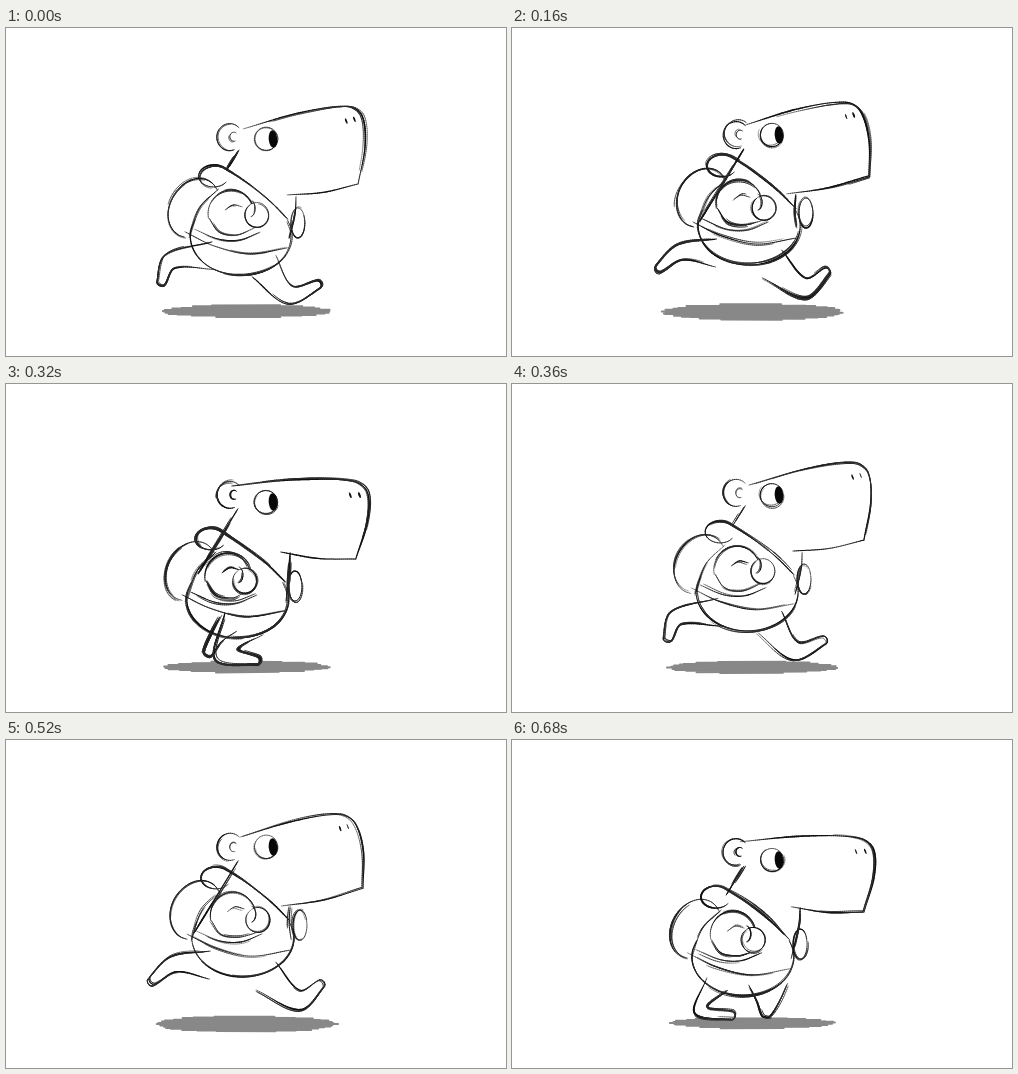
Recreate the animation shown at these times as an HTML page with a canvas. Size 500 by 328 pixels, loop 720 ms.

```html
<!DOCTYPE html>
<html lang="en">
<head>
<meta charset="utf-8">
<title>Running capybara sketch</title>
<style>
html, body { margin: 0; width: 100%; height: 100%; overflow: hidden; background: #fff; }
canvas { display: block; }
</style>
</head>
<body>
<canvas id="stage" width="500" height="328"></canvas>
<script>
const ctx = document.getElementById('stage').getContext('2d');
const LOOP = 720;

// Key positions only; the rest of the figure hangs from them.
// head: brow, snout, chin, jaw. Legs: hip, heel, toe, with a half-width at the hip.
const push = {
  ink: 1, lift: .2, ear: 109, eye: 111, tail: 1, body: [208, 148], hand: [251, 187],
  head: [[237, 101], [354, 78], [352, 156], [281, 167]],
  back: { joints: [[208, 228], [164, 234], [155, 256]], width: 14 },
  front: { joints: [[258, 238], [284, 267], [313, 256]], width: 16 }
};
const glide = {
  ink: 1.2, lift: 1, ear: 107, eye: 107, tail: 4, body: [210, 138], hand: [252, 180],
  head: [[234, 97], [345, 74], [357, 148], [275, 166]],
  back: { joints: [[204, 225], [168, 224], [146, 241]], width: 14 },
  front: { joints: [[260, 236], [294, 260], [316, 243]], width: 17 }
};
const land = {
  ink: 1.35, lift: 0, ear: 122, eye: 128, tail: .9, body: [207, 158], hand: [244, 207],
  head: [[235, 112], [342, 77], [358, 145], [274, 184]],
  back: { joints: [[208, 248], [184, 255], [175, 274]], width: 16 },
  front: { joints: [[268, 252], [263, 271], [297, 276]], width: 17 }
};
const low = {
  ink: 1.25, lift: 0, ear: 111, eye: 118, tail: 3.6, body: [205, 155], hand: [239, 197],
  head: [[226, 102], [361, 99], [350, 175], [275, 168]],
  back: { joints: [[222, 240], [210, 254], [201, 270]], width: 11 },
  front: { joints: [[238, 240], [221, 270], [252, 277]], width: 22 }
};
const air = {
  ink: .95, lift: .7, ear: 109, eye: 109, tail: 1.1, body: [207, 143], hand: [250, 183],
  head: [[241, 97], [353, 73], [353, 152], [283, 166]],
  back: { joints: [[205, 230], [191, 236], [181, 252]], width: 14 },
  front: { joints: [[232, 222], [271, 251], [297, 230]], width: 20 }
};
const squash = {
  ink: 1, lift: 0, ear: 123, eye: 128, tail: 1, body: [210, 160], hand: [244, 206],
  head: [[234, 116], [340, 79], [358, 145], [278, 184]],
  back: { joints: [[213, 252], [204, 260], [196, 269]], width: 7 },
  front: { joints: [[236, 250], [222, 271], [257, 279]], width: 22 }
};
const pass = {
  ink: 1.15, lift: 0, ear: 112, eye: 120, tail: 1.6, body: [204, 157], hand: [241, 200],
  head: [[228, 102], [360, 100], [352, 172], [279, 167]],
  back: { joints: [[205, 244], [189, 270], [221, 275]], width: 12 },
  front: { joints: [[256, 245], [256, 262], [254, 276]], width: 19 }
};

// Start time in ms and the pose held from then on.
const TIMELINE = [
  [0, push], [80, { ...air, back: push.back, front: push.front }], [160, glide], [240, land], [320, low],
  [360, push], [440, air], [520, { ...glide, ink: 1 }], [600, squash], [680, pass]
];

let seed = 1;
function rnd() {
  seed = (seed * 16807) % 2147483647;
  return seed / 2147483647;
}
const vary = a => (rnd() * 2 - 1) * a;

const add = (p, x, y) => [p[0] + x, p[1] + y];
const mix = (a, b, t) => [a[0] + (b[0] - a[0]) * t, a[1] + (b[1] - a[1]) * t];
const dist = (a, b) => Math.hypot(a[0] - b[0], a[1] - b[1]);

// Unit normal to the left of the direction a to b.
function normal(a, b) {
  const d = dist(a, b) || 1;
  return [(b[1] - a[1]) / d, (a[0] - b[0]) / d];
}

// Point along a line, pushed sideways.
function bow(a, b, t, amount) {
  const n = normal(a, b);
  return add(mix(a, b, t), n[0] * amount, n[1] * amount);
}

// Points on a tilted ellipse between two angles in degrees.
function arc([cx, cy], rx, ry, from = -30, to = 340, tilt = 0) {
  const c = Math.cos(tilt), s = Math.sin(tilt);
  return Array.from({ length: 15 }, (_, i) => {
    const a = (from + (to - from) * i / 14) * Math.PI / 180;
    const x = rx * Math.cos(a), y = ry * Math.sin(a);
    return [cx + x * c - y * s, cy + x * s + y * c];
  });
}

// Hermite curve through the points, with tangents scaled to chord length.
function smooth(pts) {
  const slope = pts.map((p, i) => {
    const a = pts[Math.max(0, i - 1)], b = pts[Math.min(pts.length - 1, i + 1)];
    const d = dist(a, p) + dist(p, b) || 1;
    return [(b[0] - a[0]) / d, (b[1] - a[1]) / d];
  });
  const out = [pts[0]];
  for (let i = 0; i < pts.length - 1; i++) {
    const d = dist(pts[i], pts[i + 1]), steps = Math.ceil(d / 2);
    for (let k = 1; k <= steps; k++) {
      const t = k / steps, u = 1 - t;
      out.push([0, 1].map(c =>
        pts[i][c] * u * u * (1 + 2 * t) + pts[i + 1][c] * t * t * (3 - 2 * t) +
        d * t * u * (slope[i][c] * u - slope[i + 1][c] * t)));
    }
  }
  return out;
}

// One tapered pencil pass over part of a curve, drifting slightly off it.
function pencil(curve, width, drift, from, to) {
  const dx = vary(drift), dy = vary(drift), phase = rnd() * 6, wave = vary(drift * .6);
  const start = Math.floor(from * (curve.length - 1));
  const end = Math.ceil(to * (curve.length - 1));
  const at = i => {
    const s = wave * Math.sin(i * .09 + phase);
    return add(curve[i], dx + s, dy - s);
  };
  for (let i = start; i < end; i++) {
    const u = (i - start + .5) / (end - start);
    const press = .4 + .6 * Math.sqrt(Math.sin(Math.PI * u));
    ctx.lineWidth = width * press * (.9 + .3 * Math.sin(i * .13 + phase));
    ctx.beginPath();
    ctx.moveTo(...at(i));
    ctx.lineTo(...at(i + 1));
    ctx.stroke();
  }
}

let ink = 1;
function sketch(pts, width, loose = 3) {
  const curve = smooth(pts);
  ctx.strokeStyle = '#111';
  pencil(curve, width * ink, .25, 0, 1);
  ctx.strokeStyle = '#2a2a2a';
  for (let i = 0; i < Math.round(loose * ink); i++) {
    const from = rnd() * .5;
    pencil(curve, width * ink * .65, 1.5 * ink, from, Math.min(1, from + .4 + rnd() * .3));
  }
}

function fillShape(pts) {
  ctx.fillStyle = '#fff';
  ctx.beginPath();
  smooth(pts).forEach(p => ctx.lineTo(...p));
  ctx.fill();
}

function drawShadow(lift) {
  const rx = 84 + 8 * lift, ry = 5.5 + 2.5 * lift, cy = 283 + lift;
  ctx.strokeStyle = '#888';
  ctx.lineWidth = 2;
  for (let v = -ry + .5; v < ry; v++) {
    const half = rx * Math.sqrt(1 - (v / ry) ** 2);
    ctx.beginPath();
    ctx.moveTo(240 - half + rnd() * 6, cy + v + vary(.5));
    ctx.lineTo(241 + half - rnd() * 6, cy + v + vary(.5));
    ctx.stroke();
  }
}

// Tapered outline around hip, heel and toe.
function legOutline({ joints: [hip, heel, toe], width }) {
  const thigh = normal(hip, heel), foot = normal(heel, toe);
  const sum = [thigh[0] + foot[0], thigh[1] + foot[1]];
  const len = Math.hypot(...sum);
  const bend = sum.map(v => v / len);
  const side = (p, n, w) => add(p, n[0] * w, n[1] * w);
  const tip = mix(heel, toe, 1.08);
  return [
    side(hip, thigh, width), side(heel, bend, width * .58), side(toe, foot, 4),
    tip,
    side(toe, foot, -4), side(heel, bend, -width * .58), side(hip, thigh, -width)
  ];
}

function drawLegs(pose) {
  const outlines = [pose.back, pose.front].map(legOutline);
  outlines.forEach(fillShape);
  outlines.forEach(o => sketch(o, 1.6));
}

function drawBody({ body, hand }) {
  const at = (x, y) => add(body, x, y);
  sketch(arc(at(-20, 32), 24, 31, -60, -285, .5), 1.2);
  sketch([at(5, 13), at(-14, 32), at(-25, 62)], 1, 2);
  sketch(arc(at(27, 60), 51, 39, -25, 205), 1.4);
  sketch([at(-29, 56), at(0, 70), at(35, 78), at(74, 72)], 1, 2);
  sketch([at(-20, 53), at(4, 63), at(25, 64), at(46, 56)], 1, 2);
  sketch(arc(at(84, 47), 7, 15), 1.1, 2);

  sketch(arc(at(17, 38), 23, 24, 170, 360), 1.2);
  sketch([at(-5, 42), at(5, 56), at(22, 59), add(hand, -3, 13)], 1.2);
  sketch([at(11, 34), at(19, 29), at(28, 31)], 1, 1);
  const fist = arc(hand, 12, 12.5, -120, 235);
  fillShape(fist);
  sketch(fist, 1.1, 2);
  sketch(arc(add(hand, -7, -6), 5, 8, -80, 80), 1, 1);

  const collar = arc(body, 15, 11, 35, 310);
  sketch([...collar, at(32, 6), at(55, 24), at(74, 43)], 1.6);
}

function drawHead({ head: [brow, snout, chin, jaw], ear, eye, tail, body }) {
  const top = bow(brow, snout, .5, 5), face = bow(snout, chin, .5, 6);
  sketch([
    brow, top, bow(brow, snout, .9, 2), bow(snout, chin, .12, 2), face,
    chin, chin, bow(chin, jaw, .5, 3), jaw
  ], 1.4, 2);
  sketch([add(jaw, 9, 1), add(jaw, 8, 18), add(body, 75, 62)], 1.5, 2);

  const earAt = [224, ear];
  sketch(arc(earAt, 13, 13.5, -45, -290), 1.2, 2);
  sketch(arc(add(earAt, 4, 0), 4, 4.5, -50, -290), 1, 1);
  const nape = add(earAt, 8, 14);
  sketch([nape, add(nape, -5.5 * tail, 9 * tail), add(nape, -11 * tail, 18 * tail)], 1.8, 2);

  for (const t of [.12, .05]) {
    const nostril = add(mix(snout, brow, t), (chin[0] - snout[0]) * .13, (chin[1] - snout[1]) * .13);
    sketch([nostril, add(nostril, 1.5, 4)], 1.4, 0);
  }

  sketch(arc([260, eye], 11.6, 11.6), .9, 2);
  ctx.fillStyle = '#080808';
  ctx.beginPath();
  ctx.ellipse(267, eye, 4.3, 8.8, -.08, 0, Math.PI * 2);
  ctx.fill();
}

function drawPose(pose, index) {
  seed = 4001 + index * 977;
  ink = pose.ink;
  ctx.fillStyle = '#fff';
  ctx.fillRect(0, 0, 500, 328);
  ctx.lineCap = 'round';
  drawShadow(pose.lift);
  drawLegs(pose);
  drawBody(pose);
  drawHead(pose);
}

const begin = performance.now();
let shown = -1;
function tick() {
  const time = (performance.now() - begin) % LOOP;
  const index = TIMELINE.findLastIndex(([start]) => start <= time);
  if (index !== shown) {
    shown = index;
    drawPose(TIMELINE[index][1], index);
  }
  requestAnimationFrame(tick);
}
tick();
</script>
</body>
</html>
```
